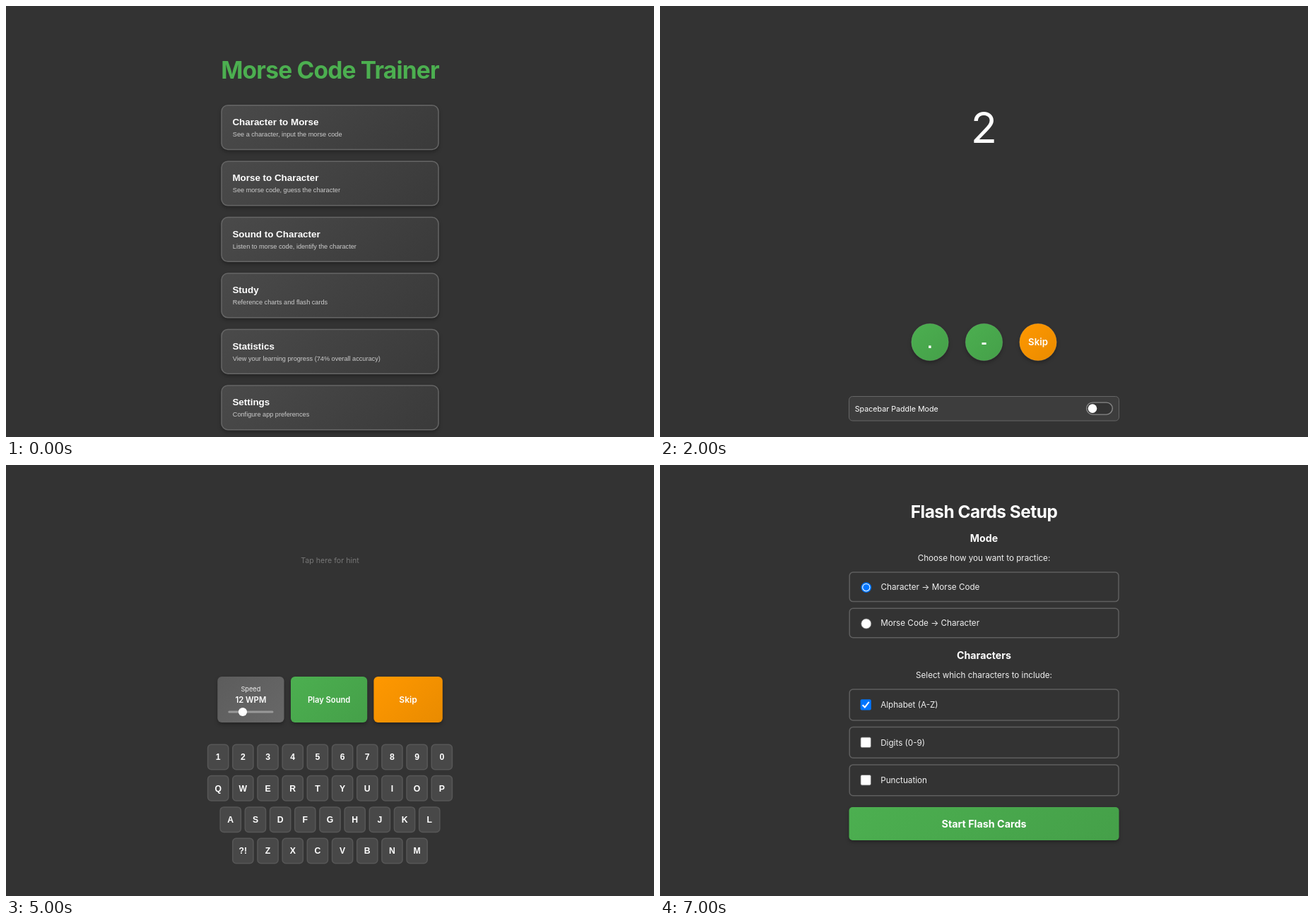
An HTML page for the animation above (8 s loop, 917 by 611 pixels).

```html
<!DOCTYPE html>
<html lang="en">
<head>
<meta charset="utf-8">
<title>Morse Code Trainer</title>
<style>
html, body { margin: 0; width: 100%; height: 100%; overflow: hidden; background: #333; }
svg { display: block; width: 917px; height: 611px; }
text { font-family: Inter, sans-serif; font-optical-sizing: none; }
text.btn { font-family: "Liberation Sans", Arial, sans-serif; }
.raised { filter: drop-shadow(0 3px 2.5px rgba(0, 0, 0, .28)); }
</style>
</head>
<body>
<svg id="stage" viewBox="0 0 917 611" xmlns="http://www.w3.org/2000/svg"></svg>
<script>
const SLOT = 1000, SLOTS = 8, MID = 458.5;
const GREEN = '#4caf50', BLUE = '#0075ff', LINE = '#666', MUTED = '#a8a8a8';
const LEAF = ['#4caf50', '#45a049'], AMBER = ['#ff9800', '#e98b00'], SLATE = ['#4a4a4a', '#3a3a3a'];
const stage = document.getElementById('stage');
let layer = stage, gradients = 0;

function add(tag, attrs, parent = layer) {
  const el = document.createElementNS('http://www.w3.org/2000/svg', tag);
  for (const key in attrs) el.setAttribute(key, attrs[key]);
  return parent.appendChild(el);
}

// Same geometry as a CSS 135deg gradient on a w x h box
function diagonal(x, y, w, h, colors) {
  const id = 'g' + gradients++, d = (w + h) / 4, cx = x + w / 2, cy = y + h / 2;
  const g = add('linearGradient', {
    id, gradientUnits: 'userSpaceOnUse', x1: cx - d, y1: cy - d, x2: cx + d, y2: cy + d
  });
  colors.forEach((c, i) => add('stop', { offset: i, 'stop-color': c }, g));
  return `url(#${id})`;
}

function box(x, y, w, h, r, fill, stroke = 'none', width = 1, extra = {}) {
  if (Array.isArray(fill)) fill = diagonal(x, y, w, h, fill);
  return add('rect', { x, y, width: w, height: h, rx: r, fill, stroke, 'stroke-width': width, ...extra });
}

const raised = { class: 'raised' };
const disc = (cx, cy, r, fill, stroke = 'none', width = 1) =>
  add('circle', { cx, cy, r, fill, stroke, 'stroke-width': width });
const line = (d, stroke, width) => add('path', { d, stroke, 'stroke-width': width, fill: 'none' });

function label(str, x, y, size, fill = '#fff', weight = 400, extra = {}) {
  add('text', { x, y, 'font-size': size, fill, 'font-weight': weight, ...extra }).textContent = str;
}
const centered = (str, x, y, size, fill, weight, extra) =>
  label(str, x, y, size, fill, weight, { 'text-anchor': 'middle', ...extra });
const plain = { class: 'btn' };

// Shows a layer from one slot up to another, with hard cuts
function scene(from, to, draw) {
  layer = add('g', {}, stage);
  draw();
  const steps = [];
  for (let i = 0; i <= SLOTS; i++) {
    steps.push({ opacity: i >= from && i < to ? 1 : 0, offset: i / SLOTS, easing: 'steps(1, end)' });
  }
  layer.animate(steps, { duration: SLOT * SLOTS, iterations: Infinity });
}

function card(x, y, w, title, note) {
  box(x, y, w, 62.7, 9, SLATE, LINE, 1.5, raised);
  label(title, x + 15.4, y + 28, 13.4, '#fff', 700, plain);
  label(note, x + 15.8, y + 44.3, 9.17, '#ccc', 400, plain);
}
const cards = (x, y, w, items) => items.forEach(([a, b], i) => card(x, y + i * 79.45, w, a, b));

function tick(x, y, size, fill, mark) {
  box(x, y, size, size, 2, fill);
  const s = size / 15;
  line(`M${x + 3 * s} ${y + 7.8 * s}L${x + 6.2 * s} ${y + 11 * s}L${x + 12 * s} ${y + 3.6 * s}`, mark, 2);
}

function roundButton(cx, cy, str) {
  const skip = str === 'Skip';
  box(cx - 26.3, cy - 26.3, 52.6, 52.6, 26.3, skip ? AMBER : LEAF, 'rgba(255,255,255,.1)', 1, raised);
  if (skip) centered(str, cx, cy + 4.7, 13.2, '#fff', 600);
  else centered(str, cx, cy + 8.7, 24.4, '#fff', 700, plain);
}

function wideButton(x, w, str, colors, size) {
  box(x, 300, w, 65, 6, colors, 'none', 1, raised);
  if (str) centered(str, x + w / 2, 337.2, size, '#fff', 600);
}

function modeRow(y, on) {
  box(267.5, y, 382, 34.5, 5, '#3d3d3d', LINE);
  label('Spacebar Paddle Mode', 275.7, y + 21.8, 10.7);
  box(603.7, y + 8.6, 36.6, 17, 8.5, on ? GREEN : '#333', on ? GREEN : '#888', 1.4);
  disc(on ? 630.5 : 612, y + 17.1, 6.3, '#fff');
}

// Main menu
scene(0, 2, () => {
  centered('Morse Code Trainer', MID, 102.7, 33.5, GREEN, 700, { 'letter-spacing': -0.8 });
  cards(305, 140.7, 307, [
    ['Character to Morse', 'See a character, input the morse code'],
    ['Morse to Character', 'See morse code, guess the character'],
    ['Sound to Character', 'Listen to morse code, identify the character'],
    ['Study', 'Reference charts and flash cards'],
    ['Statistics', 'View your learning progress (74% overall accuracy)'],
    ['Settings', 'Configure app preferences']
  ]);
});

// Settings dialog
scene(1, 2, () => {
  box(0, 0, 917, 611, 0, 'rgba(0,0,0,.5)');
  box(267.5, 64, 382, 483, 6, '#444');
  line('M267.5 123.5H649.5', '#595959', 1);
  label('Settings', 282.3, 100, 18, GREEN, 700);
  line('M621.6 90.2l7 7m0 -7l-7 7', '#ddd', 1.6);

  const note = (str, y) => label(str, 282.7, y, 10.67, MUTED);
  tick(285.8, 141.3, 15.3, GREEN, '#333');
  label('Include Punctuation', 310.2, 154.2, 12.68);
  note('Include punctuation marks in practice modes', 178.7);

  label('Morse Code Speed', 282.2, 223, 12.7, '#999');
  box(563.7, 205.3, 70.3, 25.4, 4, 'rgba(76,175,80,.2)', 'rgba(76,175,80,.5)');
  centered('12 WPM', 598.8, 223, 13.3, GREEN, 600);
  box(282.7, 250.2, 351.6, 4.6, 2.3, '#333');
  disc(384.2, 252.5, 7.6, GREEN);
  note('Adjust the speed of morse code playback (5-30 WPM)', 282);

  tick(285.8, 310.5, 15.3, GREEN, '#333');
  label('Show Accuracy Toast', 310.4, 323.7, 12.65);
  note('Display a toast notification with accuracy periodically.', 347.3);

  label('Show accuracy every', 282.4, 390.2, 12.65);
  box(417.5, 374.5, 45, 22.4, 3, '#333', LINE);
  centered('20', 440, 390.2, 12.6, '#fff', 400, plain);
  label('questions', 469, 390.2, 12.65);
  note('Shows your accuracy over the most recent questions when', 417);
  note('practicing.', 432.3);

  box(282.7, 458.2, 351.6, 28, 6, '#f44336');
  centered('Clear All Statistics', MID, 476, 11, '#fff', 400, plain);
  note('Reset all practice session data and accuracy tracking', 505.8);
});

// Character to Morse, buttons
scene(2, 3, () => {
  centered('2', MID, 193.7, 61.1);
  ['.', '-', 'Skip'].forEach((s, i) => roundButton(382 + i * 76.5, 476.5, s));
  modeRow(553.5, false);
});

// Character to Morse, spacebar paddle
scene(3, 4, () => {
  centered('2', MID, 105.8, 61.1);
  roundButton(MID, 301.6, 'Skip');
  modeRow(378.5, true);

  box(267.5, 421.5, 382, 74.5, 5, '#3d3d3d', LINE);
  centered('Paddle Speed', MID, 443.3, 9.7, '#999');
  centered('12 WPM', MID, 459.8, 12.1, GREEN, 600);
  box(281, 476.6, 358, 5, 2.5, '#efefef', '#b2b2b2', 0.6);
  box(281, 476.4, 103, 5.4, 2.7, BLUE);
  disc(384.2, 479.2, 6.1, BLUE);

  box(268.2, 505, 380.8, 90.2, 6, '#444', LINE, 1.5);
  line('M285.3 531.8V535.2H295.5V531.8', GREEN, 1.1);
  label('Press spacebar or click/tap this area', 303.4, 535, 10.95, '#fff', 600);
  const spaced = { 'letter-spacing': 0.55 };
  box(284.5, 547.8, 174, 17, 2.5, 'rgba(76,175,80,.2)', 'rgba(76,175,80,.4)');
  centered('DOT (<120ms)', 371.4, 559.6, 8.5, GREEN, 600, spaced);
  box(458.5, 547.8, 174, 17, 2.5, 'rgba(255,180,20,.22)', 'rgba(255,180,20,.55)');
  centered('DASH (96-360ms)', 545.7, 559.6, 8.5, '#ffb300', 600, spaced);
  box(284.5, 573.2, 348, 5.6, 2.8, '#333', LINE);
});

// Keyboard shared by both guessing modes
scene(4, 6, () => {
  ['1234567890', 'QWERTYUIOP', 'ASDFGHJKL', '?ZXCVBNM'].forEach((row, r) => {
    [...row].forEach((k, i) => {
      const cx = MID + (i - (row.length - 1) / 2) * 35.18, y = 396.2 + r * 44.35;
      box(cx - 14.6, y, 29.2, 35.5, 5, '#484848', '#575757', 1.5);
      centered(k === '?' ? '?!' : k, cx, y + 22.2, 12.22, '#fff', 700, plain);
    });
  });
});

// Morse to Character
scene(4, 5, () => {
  centered('-.-', MID, 180, 61.1);
  wideButton(409.8, 97.4, 'Skip', AMBER, 12.1);
});

// Sound to Character
scene(5, 6, () => {
  centered('Tap here for hint', MID, 139, 10.6, '#777');
  wideButton(299.3, 94.2, '', ['#5c5c5c', '#686868']);
  centered('Speed', 346.4, 321.4, 9.2, '#eee');
  centered('12 WPM', 346.4, 337, 11.3, '#fff', 600);
  box(314.3, 348.5, 64.2, 3, 1.5, '#999');
  disc(335, 350, 6.1, '#fff');
  wideButton(403, 108.2, 'Play Sound', LEAF, 11.15);
  wideButton(520.4, 97.4, 'Skip', AMBER, 12.1);
});

// Study menu
scene(6, 7, () => {
  centered('Study', MID, 97, 24.4, '#fff', 700, { 'letter-spacing': -0.5 });
  cards(268.2, 130, 380.8, [
    ['Alphabet', 'Morse code for the letters A-Z'],
    ['Digits', 'Morse code for the digits 0-9'],
    ['Punctuation', 'Morse code for punctuation marks'],
    ['All Characters', 'The complete reference chart'],
    ['Flash Cards', 'Practice with flash cards']
  ]);
});

// Flash card setup
scene(7, 8, () => {
  centered('Flash Cards Setup', MID, 75.2, 24.4, '#fff', 700, { 'letter-spacing': -0.5 });
  const section = (title, note, y) => {
    centered(title, MID, y, 14.2, '#fff', 700);
    centered(note, MID, y + 27.4, 11.65, '#f0f0f0');
  };
  const option = (str, x, y, h) => {
    box(268.2, y, 380.8, h, 5, 'none', '#5f5f5f', 1.5);
    label(str, x, y + h / 2 + 4.2, 11.68, '#f0f0f0');
  };

  section('Mode', 'Choose how you want to practice:', 108.8);
  option('Character → Morse Code', 312.5, 152, 41.6);
  disc(291.8, 173.6, 6.5, '#fff', BLUE, 1.7);
  disc(291.8, 173.6, 4.6, BLUE);
  option('Morse Code → Character', 312.2, 203.2, 41.6);
  disc(291.8, 225, 7.1, '#fff', '#767676', 0.8);

  section('Characters', 'Select which characters to include:', 274.9);
  ['Alphabet (A-Z)', 'Digits (0-9)', 'Punctuation'].forEach((str, i) => {
    const y = 318.1 + i * 53.4;
    option(str, 312.2, y, 43.8);
    if (i === 0) tick(283.6, y + 14.2, 15.2, BLUE, '#fff');
    else box(284, y + 14.6, 14.4, 14.4, 1.8, '#fff', '#767676', 0.8);
  });

  box(267.5, 485, 382, 47, 5, LEAF, 'none', 1, raised);
  centered('Start Flash Cards', MID, 513.8, 14.3, '#fff', 700);
});
</script>
</body>
</html>
```
